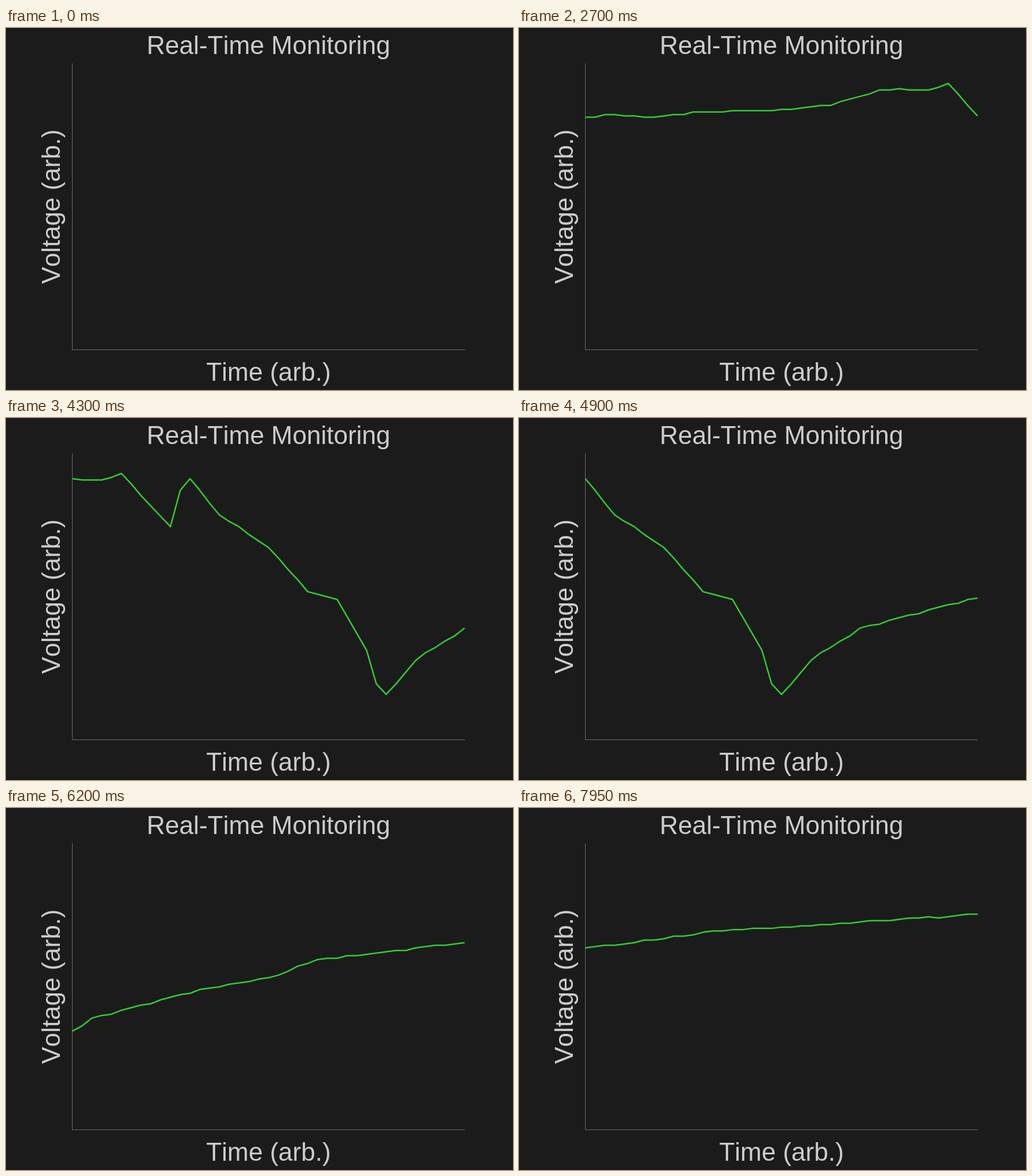
An HTML page that plays this animation: 875 by 625 pixels, repeating every 8000 ms.

```html
<!DOCTYPE html>
<html lang="en">
<head>
<meta charset="utf-8">
<title>Real-Time Monitoring</title>
<style>
  html, body { margin: 0; width: 100%; height: 100%; overflow: hidden; background: #1b1b1b; }
  svg { display: block; width: 875px; height: 625px; }
  text { font: 44px "Liberation Sans", Arial, sans-serif; font-kerning: none; text-anchor: middle; fill: #ccc; }
  #trace { fill: none; stroke: #32cd32; stroke-width: 2.5; stroke-linejoin: round; }
</style>
</head>
<body>
<svg viewBox="0 0 875 625">
  <text x="453" y="45">Real-Time Monitoring</text>
  <text x="453" y="608.5">Time (arb.)</text>
  <text transform="translate(93 308.5) rotate(-90)">Voltage (arb.)</text>
  <g fill="#6c6c6c" shape-rendering="crispEdges">
    <rect x="114" y="61" width="1" height="495"/>
    <rect x="114" y="555" width="678" height="1"/>
  </g>
  <polyline id="trace"/>
</svg>
<script>
const STEP = 50, STEPS = 160, WINDOW = 40;
const LEFT = 114.5, RIGHT = 791.5, BASE = 167.5, UNIT = 2.243;

// Turning points of the signal: [sample, level].
const turns = [
  [0, 0], [8, 2], [17, 8], [20, 6], [26, 10], [35, 12], [39, 15], [44, 27], [49, 27],
  [51, 32], [54, 7], [56, -9], [57, 19], [58, 28], [61, 0], [66, -25], [70, -59],
  [73, -65], [76, -104], [77, -130], [78, -138], [81, -112], [86, -87], [98, -64],
  [104, -56], [109, -42], [124, -29], [132, -20], [146, -14], [159, -7]
];

// Seeded noise between -0.7 and 0.7 levels.
function noise(i) {
  const s = Math.sin(i * 12.9898 + 4.1) * 43758.5453;
  return (s - Math.floor(s) - 0.5) * 1.4;
}

// Straight runs between the turns, with sensor noise, quantised to whole levels.
function level(i) {
  const k = Math.max(1, turns.findIndex(([sample]) => sample >= i));
  const [a, from] = turns[k - 1], [b, to] = turns[k];
  const value = from + (to - from) * (i - a) / (b - a);
  return Math.round(i === a || i === b ? value : value + noise(i));
}

const levels = Array.from({ length: STEPS }, (_, i) => level(i));
const trace = document.getElementById("trace");

// The trace fills the plot from the left, then scrolls.
function draw(n) {
  const first = Math.max(0, n - WINDOW);
  const dx = (RIGHT - LEFT) / (n < WINDOW ? WINDOW - 1 : WINDOW);
  const points = levels.slice(first, n + 1)
    .map((v, j) => `${(LEFT + j * dx).toFixed(2)},${(BASE - v * UNIT).toFixed(2)}`);
  trace.setAttribute("points", n ? points.join(" ") : "");
}

const start = performance.now();
let shown = -1;
function tick(now) {
  const n = Math.floor(Math.max(0, now - start) / STEP) % STEPS;
  if (n !== shown) draw(shown = n);
  requestAnimationFrame(tick);
}
tick(start);
</script>
</body>
</html>
```
